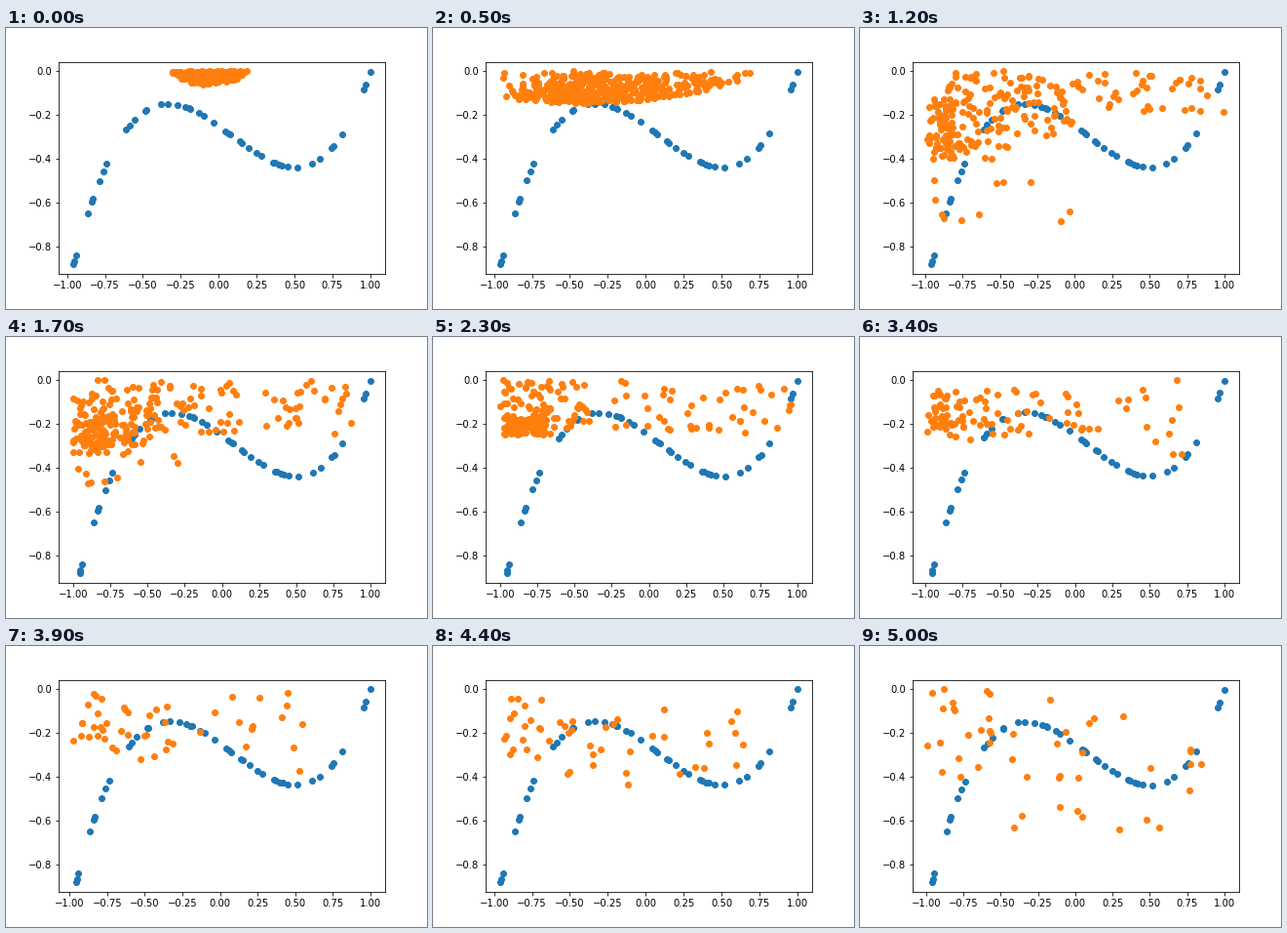
Recreate the animation shown at these times as a matplotlib script. Size 432 px wide and 288 px high, loop 5100 ms.

```python
import numpy as np
import matplotlib.pyplot as plt
from matplotlib.animation import FuncAnimation

FRAMES, INTERVAL = 51, 100
rng = np.random.default_rng(7)


def cubic(x):
    return x**3 - 0.25 * x**2 - 0.5 * x - 0.25


def dome(n, center, half, depth, power):
    """Points hanging below zero inside a bowl; a small power fills its rim."""
    x = rng.triangular(max(center - half, -1), center, center + half, n)
    limit = depth * (1 - ((x - center) / half)**2)**0.75
    return np.column_stack([x, -limit * rng.random(n)**power])


def patch(n, left, right, top, bottom):
    return np.column_stack([rng.uniform(left, right, n),
                            -rng.uniform(top, bottom, n)])


def patches(left, *boxes):
    """Join uniform boxes; the outermost point sits exactly at left."""
    p = np.concatenate([patch(*box) for box in boxes])
    p[p[:, 0].argmin(), 0] = left
    return p


def arrange(p, columns=8):
    """Order a cloud by columns, then by height, so clouds can be paired."""
    strips = np.array_split(p[np.argsort(p[:, 0])], columns)
    return np.concatenate([s[np.argsort(s[:, 1])] for s in strips])


# Step at which the swarm reaches each cloud.
STAGES = {
    0: dome(240, -0.06, 0.27, 0.06, 2),
    5: dome(400, -0.4, 1.13, 0.145, 0.65),
    12: patches(-0.985,
                (70, -0.985, -0.8, 0.12, 0.4), (75, -0.88, -0.45, 0, 0.4),
                (55, -0.5, 0, 0.02, 0.3), (38, 0, 1, 0, 0.19),
                (11, -0.95, 0, 0.4, 0.7)),
    23: patches(-1,
                (110, -0.98, -0.7, 0.16, 0.25), (35, -1, -0.65, 0, 0.16),
                (32, -0.7, -0.4, 0, 0.25), (45, -0.35, 0.96, 0, 0.24)),
    30: patches(-1,
                (65, -1, -0.87, 0.09, 0.21), (38, -0.85, -0.43, 0, 0.21),
                (17, -0.4, 0, 0.02, 0.28), (23, 0, 0.96, 0, 0.32)),
    39: patches(-0.975,
                (16, -0.975, -0.75, 0.02, 0.24), (18, -0.72, -0.3, 0.03, 0.32),
                (14, -0.3, 0.62, 0, 0.4)),
    50: patches(-0.99,
                (20, -0.99, -0.55, 0, 0.4), (22, -0.45, 0.6, 0.04, 0.65),
                (5, 0.75, 0.93, 0.25, 0.55)),
}
STEPS = list(STAGES)
CLOUDS = [arrange(p) for p in STAGES.values()]


def swarm(frame):
    k = min(np.searchsorted(STEPS, frame, side="right") - 1, len(STEPS) - 2)
    t = (frame - STEPS[k]) / (STEPS[k + 1] - STEPS[k])
    a, b = CLOUDS[k], CLOUDS[k + 1]
    n = round(len(a) + (len(b) - len(a)) * t)
    order = np.arange(n)
    p = a[order * len(a) // n] * (1 - t) + b[order * len(b) // n] * t
    shake = np.random.default_rng(frame).normal(size=p.shape)
    p = p + shake * [0.03, 0.015] * np.sin(np.pi * t)
    return np.clip(p, -1, [1, 0])


def padded(values):
    lo, hi = values.min(), values.max()
    margin = 0.05 * (hi - lo)
    return lo - margin, hi + margin


data_x = np.array([
    -.958, -.953, -.943, -.864, -.838, -.832, -.787, -.761, -.739, -.61, -.588,
    -.556, -.485, -.479, -.382, -.337, -.273, -.222, -.196, -.187, -.132, -.1,
    -.036, .044, .061, .076, .137, .15, .195, .247, .279, .356, .369, .397,
    .417, .452, .517, .613, .664, .741, .756, .812, .955, .968, .998])
data = np.column_stack([data_x, cubic(data_x)])

fig, ax = plt.subplots(figsize=(6, 4), dpi=72)
fig.subplots_adjust(left=0.125, right=0.9, bottom=0.125, top=0.88)
ax.scatter(*data.T, color="C0")
dots = ax.scatter([], [], color="C1")


def update(frame):
    p = swarm(frame)
    dots.set_offsets(p)
    everything = np.concatenate([data, p])
    ax.set_xlim(padded(everything[:, 0]))
    ax.set_ylim(padded(everything[:, 1]))
    return dots,


anim = FuncAnimation(fig, update, frames=FRAMES, interval=INTERVAL, repeat=True)
plt.show()
```
